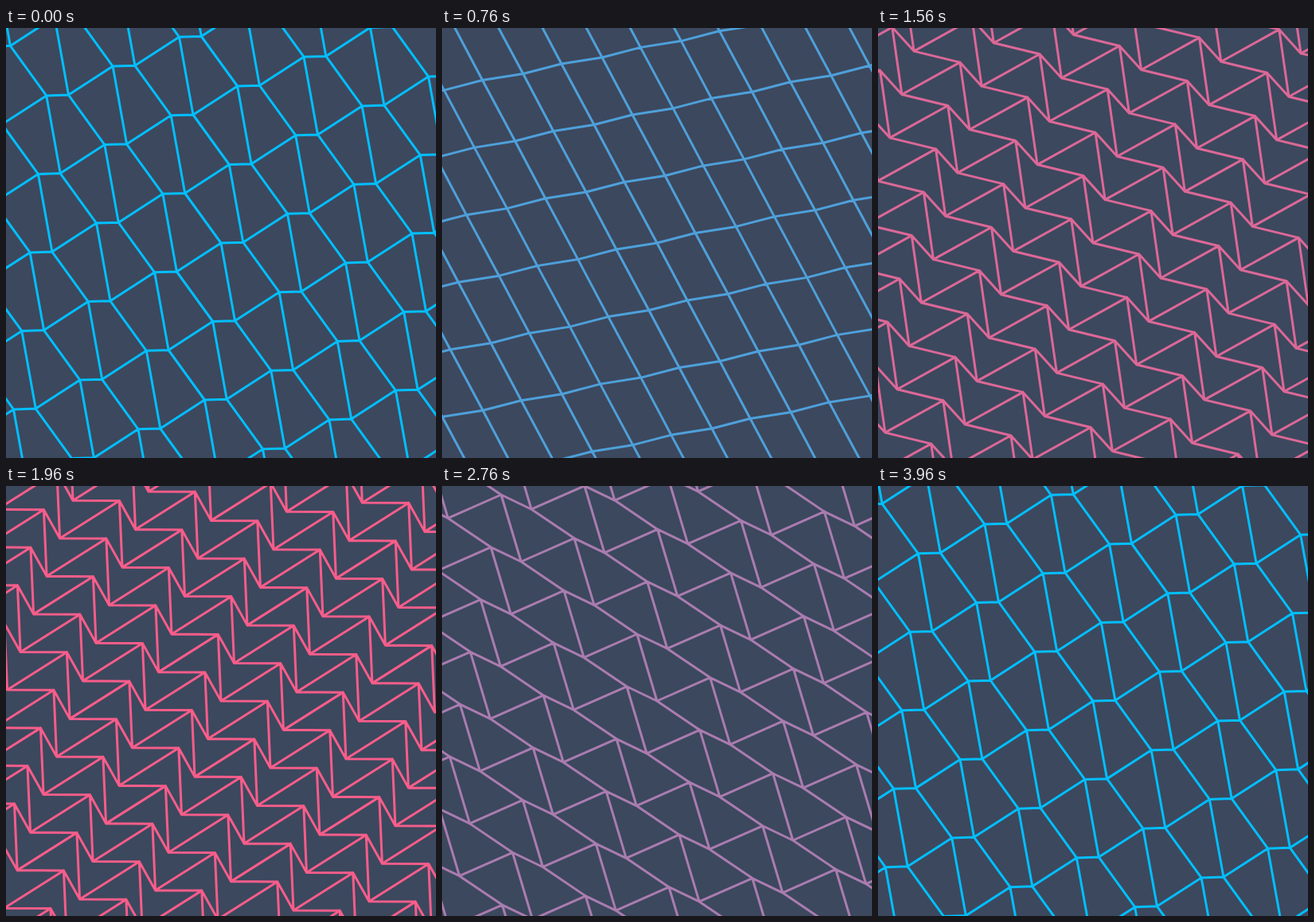
Animation of 540x540 px, one loop 4000 ms. Source, as an HTML page with a canvas:

```html
<!DOCTYPE html>
<html lang="en">
<head>
<meta charset="utf-8">
<title>Quadrilateral tiling</title>
<style>
  html, body { margin: 0; width: 100%; height: 100%; overflow: hidden; background: #3c485e; }
  canvas { display: block; width: 540px; height: 540px; }
</style>
</head>
<body>
<canvas id="stage" width="540" height="540"></canvas>
<script>
const ctx = document.getElementById("stage").getContext("2d");
const SIZE = 540, CENTER = SIZE / 2, LOOP = 4000, STEP = 40, REACH = 9;

const cubic = (s, a, b, c, d = 0) => a + s * (b + s * (c + s * d));
const mix = (from, to, s) => from.map((c, i) => Math.round(c + (to[i] - c) * s));
const BLUE = [0, 191, 255], PINK = [248, 93, 138];

function draw(time) {
  const s = (1 - Math.cos(2 * Math.PI * time / LOOP)) / 2;

  // Lattice vectors u, v and the edge that joins the two kinds of vertex
  const ux = cubic(s, 83.4, 63, -36, -15.5), uy = cubic(s, -36.8, 63.2, -37.6);
  const vx = cubic(s, -10.3, 5.8, -18.5, 6.5), vy = cubic(s, 98.5, -41, -10);
  const ex = cubic(s, 27.8, 67.5, -5, -15.5), ey = cubic(s, -0.8, -34, -9, -3.5);
  const edges = [
    [ex, ey],
    [ex + vx, ey + vy],
    [ex - ux, ey - uy],
    [ex - ux - vx, ey - uy - vy]
  ];

  ctx.fillStyle = "#3c485e";
  ctx.fillRect(0, 0, SIZE, SIZE);
  ctx.strokeStyle = `rgb(${mix(BLUE, PINK, s)})`;
  ctx.lineWidth = 3;
  ctx.lineCap = "round";
  ctx.beginPath();
  for (let i = -REACH; i <= REACH; i++) {
    for (let j = -REACH; j <= REACH; j++) {
      const x = CENTER + i * ux + j * vx, y = CENTER + i * uy + j * vy;
      for (const [dx, dy] of edges) {
        ctx.moveTo(x, y);
        ctx.lineTo(x + dx, y + dy);
      }
    }
  }
  ctx.stroke();
}

const start = performance.now();
function tick() {
  const time = (performance.now() - start) % LOOP;
  draw(Math.floor(time / STEP) * STEP);
  requestAnimationFrame(tick);
}
tick();
</script>
</body>
</html>
```
